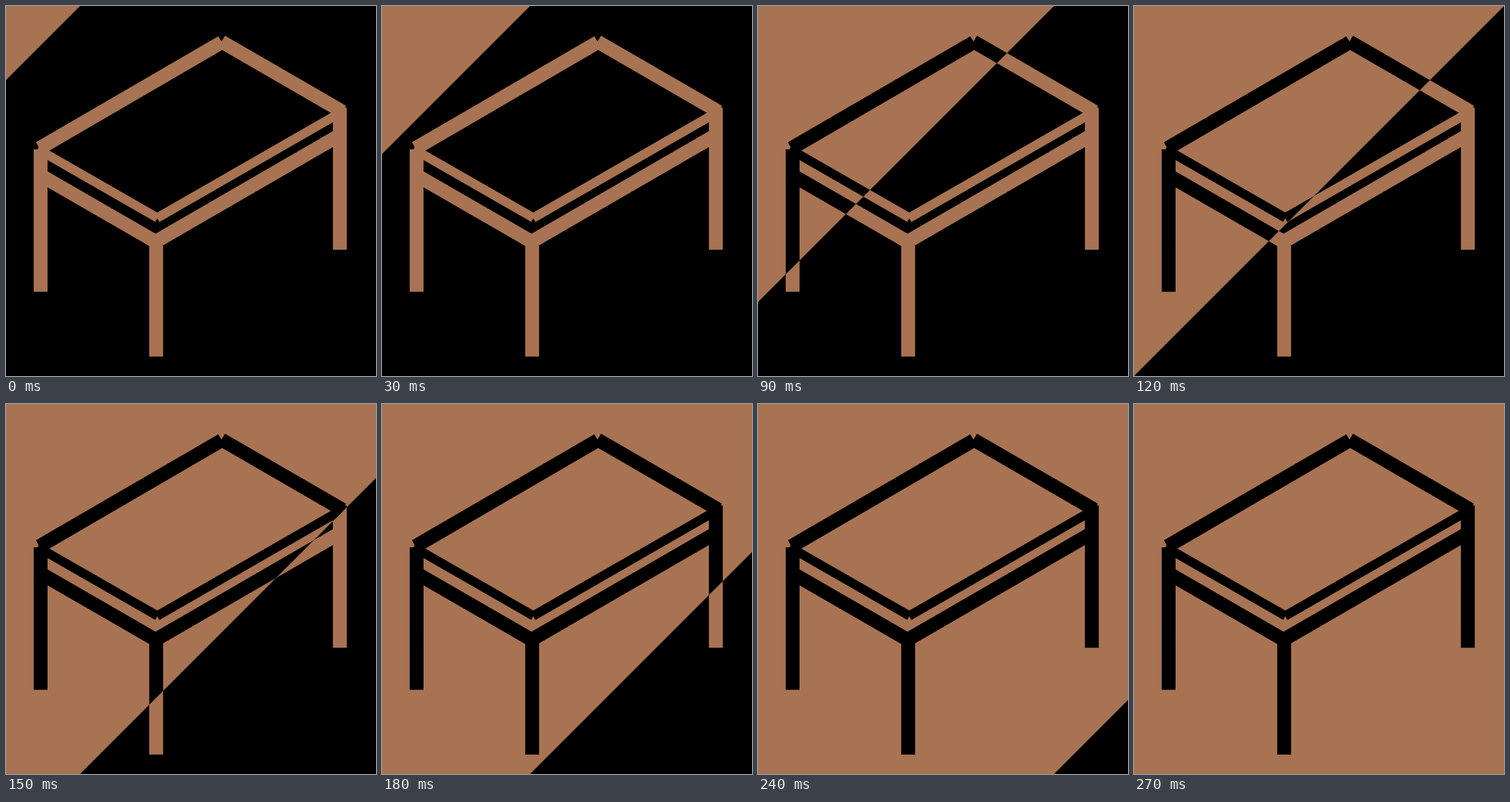
Recreate the animation shown at these times as an HTML page with a canvas. Size 480 px wide and 480 px high, loop 300 ms.

```html
<!DOCTYPE html>
<html>
<head>
<meta charset="utf-8">
<style>
  html, body { margin: 0; height: 100%; overflow: hidden; background: #000; }
  canvas { display: block; }
</style>
</head>
<body>
<canvas id="stage" width="480" height="480"></canvas>
<script>
const SIZE = 480, STEPS = 10, STEP_MS = 30;
const BROWN = '#a87352', BLACK = '#000';
const ctx = document.getElementById('stage').getContext('2d');

const thickLines = new Path2D(
  'M43.3 184.6L280 47M279.6 46.2L436.5 137' +        // back edges of the top
  'M45 219.8L194.5 306M194.5 305.5L433 167.5' +      // apron
  'M44.9 186V370.8M194.8 306V454.8M433.1 131.8V316.2' // legs
);
const thinLines = new Path2D('M41 185.6L196.5 274.9M196 275L436 137.2');

function drawTable(line, ground) {
  ctx.fillStyle = ground;
  ctx.fillRect(0, 0, SIZE, SIZE);
  ctx.strokeStyle = line;
  ctx.lineWidth = 18;
  ctx.stroke(thickLines);
  ctx.lineWidth = 11.9;
  ctx.stroke(thinLines);
}

function draw(now) {
  const step = Math.floor(now / STEP_MS) % STEPS + 1;
  const reach = step * 2 * SIZE / STEPS;

  drawTable(BROWN, BLACK);

  // inverted colours behind the diagonal wipe
  ctx.save();
  ctx.beginPath();
  ctx.moveTo(0, 0);
  ctx.lineTo(reach, 0);
  ctx.lineTo(0, reach);
  ctx.clip();
  drawTable(BLACK, BROWN);
  ctx.restore();

  requestAnimationFrame(draw);
}

draw(performance.now());
</script>
</body>
</html>
```
